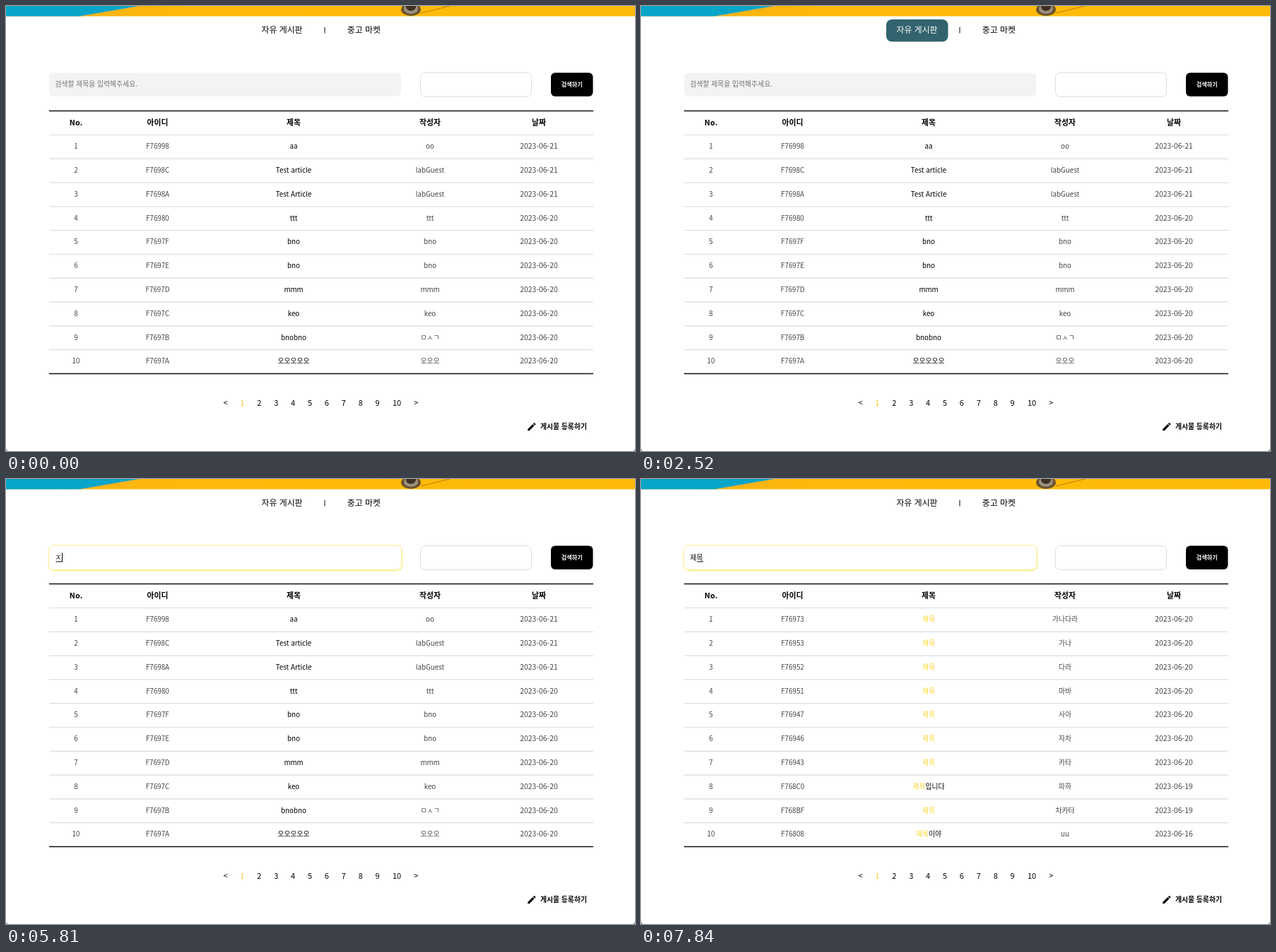
Write an HTML page that moves like this. It is 890 px wide and 630 px high and loops after 8000 ms.

```html
<!DOCTYPE html>
<html lang="ko">
<head>
<meta charset="utf-8">
<title>게시판</title>
<style>
  html, body { margin: 0; width: 100%; height: 100%; overflow: hidden; background: white; }
  svg { display: block; width: 890px; height: 630px; }
  text { font-family: "Noto Sans CJK KR", "Noto Sans CJK", sans-serif; font-size: 9.8px; fill: #000; white-space: pre; }
  .cell { fill: #444; }
  .date { font-size: 10.4px; fill: #444; }
  .head { font-size: 10.8px; font-weight: 700; }
  .title, .page { font-weight: 500; }
  .page { font-size: 11px; }
  .tab { font-size: 11.9px; font-weight: 500; }
  .mark { fill: #fad62b; }
  .now { fill: #fcc62e; }
</style>
</head>
<body>
<svg viewBox="0 0 890 630">
  <defs>
    <linearGradient id="wall">
      <stop offset="0" stop-color="#f6b016"/><stop offset=".3" stop-color="#fdb90b"/><stop offset="1" stop-color="#fdbb08"/>
    </linearGradient>
    <filter id="glow" x="-5%" y="-20%" width="110%" height="150%">
      <feDropShadow dx=".4" dy=".8" stdDeviation=".9" flood-color="#f7e04a" flood-opacity=".9"/>
    </filter>
    <clipPath id="strip"><path d="M0 0H890V14.5H0z"/></clipPath>
  </defs>

  <g clip-path="url(#strip)">
    <path d="M0 0H890V15H0z" fill="url(#wall)"/>
    <path d="M0 0H190L103 15H0z" fill="#07a5c8"/>
    <path d="M190 0L103 15" stroke="#d5b04a"/>
    <path d="M587 10L628 0" stroke="#b97f0b" fill="none"/>
    <ellipse cx="573" cy="5" rx="14" ry="9" fill="#6b542c"/>
    <ellipse cx="573" cy="4" rx="10" ry="7" fill="#9a8f80"/>
    <ellipse cx="573" cy="1" rx="7" ry="6" fill="#3f3021"/>
  </g>
  <path d="M0 627V630H3Q.5 629.5 0 627zM890 627V630H887Q889.5 629.5 890 627z" fill="#777"/>

  <rect id="hover" x="347" y="19" width="87.5" height="31.5" rx="8" fill="#33636e"/>
  <g id="tabs"></g>

  <rect id="idleBox" x="61" y="94.5" width="498" height="33.5" rx="6.5" fill="#f3f3f3"/>
  <rect id="focusBox" x="60.5" y="94" width="499" height="34.5" rx="7" fill="white" stroke="#fbf2a6" filter="url(#glow)"/>
  <rect x="586.5" y="94.5" width="157" height="34" rx="6.5" fill="white" stroke="#ddd"/>
  <rect x="771" y="94.5" width="59.5" height="33.5" rx="6" fill="#000"/>
  <g id="labels"></g>
  <text id="query" x="69.5" y="114.5"></text>
  <path id="underline" stroke="#000" stroke-width="1"/>
  <path id="caret" stroke="#000" stroke-width="1"/>

  <g id="rules"></g>
  <g id="list"></g>
  <path transform="translate(736.3 588.1) scale(.63)" d="M3 17.25V21h3.75L17.81 9.94l-3.75-3.75zM20.71 7.04a1 1 0 0 0 0-1.41l-2.34-2.34a1 1 0 0 0-1.41 0l-1.83 1.83 3.75 3.75z"/>
  <g id="tip">
    <rect x="55" y="614.5" width="130" height="24" rx="5" fill="#eee"/>
    <text x="120" y="630" text-anchor="middle" style="font-size:11.5px;fill:#555">Source Editor Tool</text>
  </g>
</svg>
<script>
const LOOP = 8000, STEP = 70;
const $ = id => document.getElementById(id);
const columns = [99, 214.5, 407, 600, 754];

const text = (x, y, content, cls = '', extra = 'text-anchor="middle"') =>
  `<text x="${x}" y="${y}" class="${cls}" ${extra}>${content}</text>`;
const show = (id, on) => $(id).style.display = on ? '' : 'none';

// Each row: id, title, author, date.
const parse = (year, rows) => rows.trim().split('\n').map(line => {
  const [id, title, author, day] = line.trim().split('|');
  return [id, title, author, `${year}-${day}`];
});

const lists = {
  all: { pages: 10, keyword: '', rows: parse(2023, `
    F76998|aa|oo|06-21
    F7698C|Test article|labGuest|06-21
    F7698A|Test Article|labGuest|06-21
    F76980|ttt|ttt|06-20
    F7697F|bno|bno|06-20
    F7697E|bno|bno|06-20
    F7697D|mmm|mmm|06-20
    F7697C|keo|keo|06-20
    F7697B|bnobno|ㅁㅅㄱ|06-20
    F7697A|오오오오오|오오오|06-20`) },
  jamo: { pages: 2, keyword: 'ㅈ', rows: parse(2023, `
    F76699|ㅁㅈㄷㅁㅈㄷㅁㅈㄷㅁㅈㄷ|bno@mail.test|06-12
    F76698|ㅁㅈㄷㅁㅈㄷㅁㅈㄷㅈㅁㄷ|bno@mail.test|06-12
    1B8B60|ㅈㄷㄹ|ㄱㅁㄴㄱㅁㄴㄱㅁ|04-09
    1B8B5D|ㅈㄷㄹㅈㄷ|777|04-09
    1B8965|ㅈㅂ|ㄹㅅㅎ|04-09
    1B863A|ㅈㄷㅁㅈㄷㅁㅈㄷㅁ|ㄷ55|04-06
    1B85CD|ㅈㅁㅈㄷㄹ|ㅁㄱㅁㄱ77777777|04-06
    1B85CB|ㅈㅁㅈ|7777|04-06
    1B85C9|ㅈㅁ|ㄱㅎㄱㅎ|04-06
    1B85BC|ㅈㄷㄹㄹ|ㄴㅁㄴ|04-06`) },
  word: { pages: 10, keyword: '제목', rows: parse(2023, `
    F76973|제목|가나다라|06-20
    F76953|제목|가나|06-20
    F76952|제목|다라|06-20
    F76951|제목|마바|06-20
    F76947|제목|사아|06-20
    F76946|제목|자차|06-20
    F76943|제목|카타|06-20
    F768C0|제목입니다|파하|06-19
    F768BF|제목|차카타|06-19
    F76808|제목이야|uu|06-16`) }
};

function listMarkup({ pages, keyword, rows }) {
  const classes = ['cell', 'cell', 'title', 'cell', 'date'];
  const body = rows.map(([id, title, author, date], i) => {
    const marked = keyword
      ? title.replaceAll(keyword, `<tspan class="mark">${keyword}</tspan>`) : title;
    return [i + 1, id, marked, author, date]
      .map((value, c) => text(columns[c], 202.2 + 33.8 * i, value, classes[c])).join('');
  }).join('');
  const start = pages === 10 ? 310.5 : 410;
  const pager = Array.from({ length: pages + 2 }, (_, i) => {
    const label = i === 0 ? '&lt;' : i > pages ? '&gt;' : i;
    const x = start + 23.9 * i + Math.max(0, i - 9) * 3.5;
    return text(x, 566.3, label, i === 1 ? 'page now' : 'page');
  }).join('');
  return body + pager;
}
for (const list of Object.values(lists)) list.markup = listMarkup(list);

$('labels').innerHTML =
  text(69.5, 114.3, '검색할 제목을 입력해주세요.', '', 'id="placeholder" style="fill:#757575"') +
  text(800.7, 114.2, '검색하기', '', 'text-anchor="middle" style="font-size:8.2px;font-weight:700;fill:white"') +
  text(789, 599, '게시물 등록하기', '', 'text-anchor="middle" style="font-weight:700"') +
  ['No.', '아이디', '제목', '작성자', '날짜'].map((h, i) => text(columns[i], 168.7, h, 'head')).join('');
$('tabs').innerHTML =
  text(390.5, 38.3, '자유 게시판', 'tab', 'id="boardTab" text-anchor="middle"') +
  text(506.3, 38.3, '중고 마켓', 'tab') +
  '<path d="M451 30V38.5" stroke="#000"/>';
$('rules').innerHTML = Array.from({ length: 12 }, (_, i) => {
  const edge = i === 0 || i === 11;
  const y = i ? 182.5 + 33.8 * (i - 1) : 148.4;
  return `<path d="M61 ${y}H831" stroke="${edge ? '#111' : '#ddd'}" stroke-width="${edge ? 1.5 : 1.2}"/>`;
}).join('');

// Typed text from each moment on.
const typing = [[0, ''], [5810, 'ㅈ'], [6580, '제'], [7000, '젬'], [7070, '제모'], [7280, '제목']];
let shownList;

function draw(t) {
  const hovering = t >= 2520 && t < 4130;
  show('hover', hovering);
  $('boardTab').style.fill = hovering ? 'white' : 'black';

  const focused = t >= 4760;
  show('idleBox', !focused);
  show('focusBox', focused);
  const query = typing.findLast(([from]) => t >= from)[1];
  show('placeholder', !query);
  $('query').textContent = query;

  const end = 70 + 9 * query.length;
  const caretOn = focused && !(t >= 5250 && t < 5810) && !(t >= 6370 && t < 6580) && t < 7770;
  show('caret', caretOn);
  $('caret').setAttribute('d', `M${end + .5} 104.5V117.5`);
  show('underline', query);
  $('underline').setAttribute('d', `M${end - 8.5} 117H${end}`);

  const list = t < 6440 ? lists.all : t < 7840 ? lists.jamo : lists.word;
  if (list !== shownList) {
    $('list').innerHTML = list.markup;
    shownList = list;
  }

  // The label slides left along the bottom edge and fades to a trace.
  show('tip', t >= 420 && t < 2520);
  const p = Math.min(1, Math.max(0, Math.floor((t - 420) / STEP) / 5));
  $('tip').setAttribute('transform', `translate(${175 * (1 - p) ** 2} 0)`);
  $('tip').setAttribute('opacity', 1 - .9 * p);
}

function tick() {
  draw(performance.now() % LOOP);
  requestAnimationFrame(tick);
}
tick();
</script>
</body>
</html>
```
